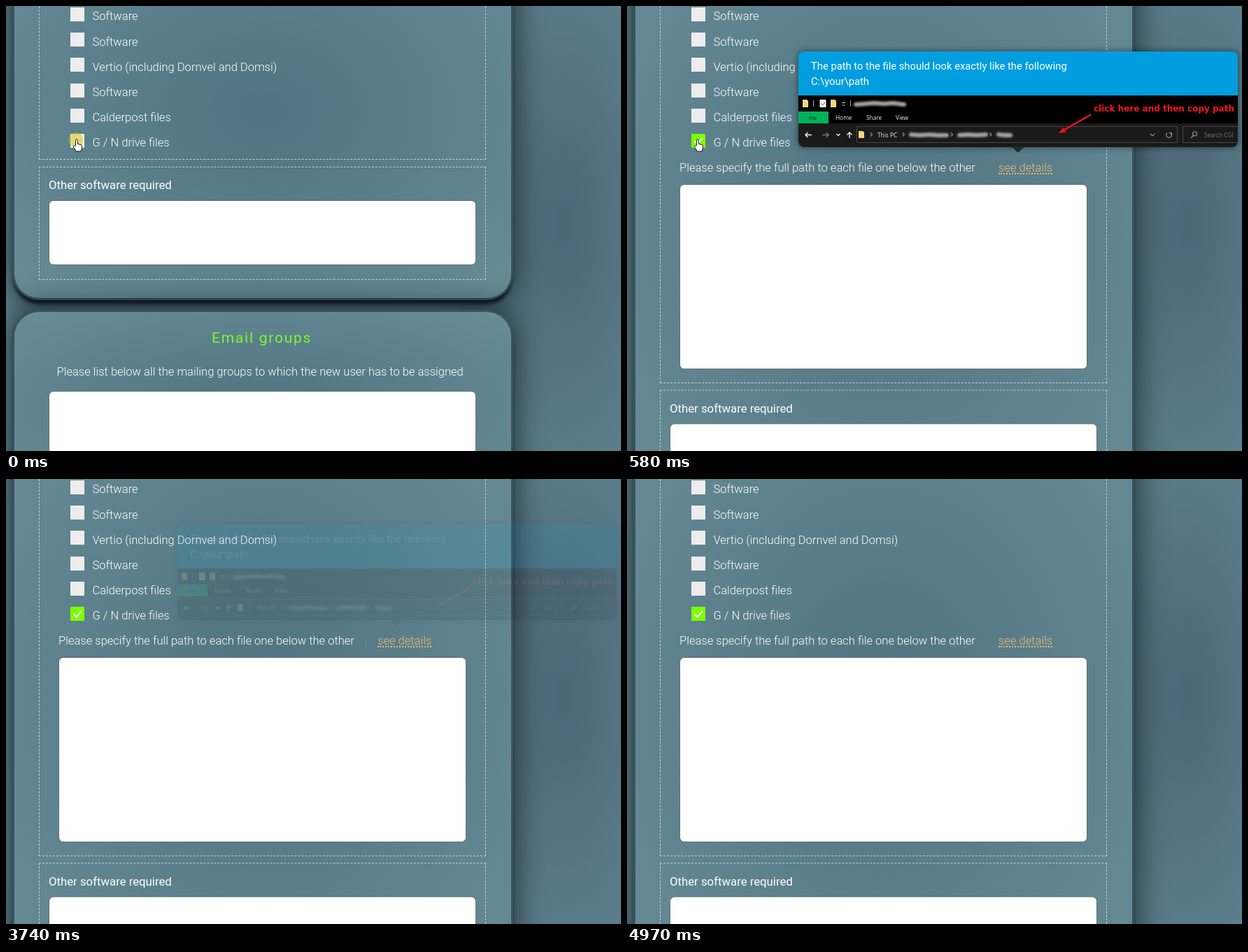
Recreate the animation shown at these times as an HTML page. Size 879 by 637 pixels, loop 5560 ms.

```html
<!DOCTYPE html>
<html lang="en">
<head>
<meta charset="utf-8">
<title>Form with path tooltip</title>
<style>
@property --d { syntax: "<length>"; inherits: true; initial-value: 0px; }

html, body { margin: 0; width: 100%; height: 100%; overflow: hidden; }
body {
  position: relative;
  font: 300 16.55px/20px Roboto, sans-serif;
  color: #fff;
  background: radial-gradient(ellipse 190px 480px at 798px 310px, #4c6676, #5f8590) #4c6676;
  animation: grow 5560ms infinite;
}
body *, body *::before { position: absolute; box-sizing: border-box; }
svg * { position: static; }
span { white-space: pre; }

.panel {
  left: 12px; width: 710px; border-radius: 35px;
  background: radial-gradient(ellipse at center, #4f7380, #688d97);
  box-shadow: 0 0 0 3px #3a525c, 0 8px 5px 1px #10181d, 0 0 40px 9px rgba(14, 24, 32, .68);
}
.main { top: -118px; height: calc(536px + var(--d)); }
.mail { top: 438px; height: 270px; }
.group { left: 47px; width: 639px; border: 1px dashed rgba(225, 235, 235, .75); }
.options { top: -40px; height: calc(260px + var(--d)); }
.other { top: 230px; height: 162px; }
.field { left: 61px; width: 611px; background: #fff; border: 1px solid #666c6f; border-radius: 7px; }
.lower { left: 0; top: 0; width: 879px; height: 900px; transform: translateY(var(--d)); }
.details { left: 0; top: 212px; width: 700px; height: calc(8px + var(--d)); overflow: hidden; animation: shown 5560ms infinite; }
.details .field { left: 75px; top: 43px; width: 583px; height: 265px; }
.link { left: 531px; top: 10.4px; height: 19px; color: #f6ba72; border-bottom: 2px dotted #f6ba72; }

.box { left: 92px; width: 20px; height: 20px; background: #eeecec; }
.checked { top: 183px; background: #7dff00; animation: shown 5560ms infinite; }
.halo { left: 89px; top: 181px; width: 21px; height: 21px; border-radius: 50%; animation: pressed 5560ms infinite; }
.under { background: #67b548; }
.over { left: 92px; top: 183px; width: 20px; height: 20px; overflow: hidden; animation: pressed 5560ms infinite; }
.over::before { content: ""; left: -3px; top: -2px; width: 21px; height: 21px; border-radius: 50%; background: rgba(228, 200, 62, .65); }

.tip { left: 245px; top: 65px; width: 628px; height: 145px; animation: tip 5560ms infinite; }
.card { width: 628px; height: 137px; border-radius: 8px; overflow: hidden; background: #009ddf; box-shadow: 0 0 9px 1px rgba(0, 0, 0, .45); }
.card span { left: 18px; font-size: 14.75px; font-weight: 400; }
.card svg { left: 0; top: 63px; }
.notch { left: 304px; top: 136px; border: 10px solid transparent; border-bottom: 0; border-top: 9px solid #20292d; }
.shot text { font: 8.3px "Open Sans", sans-serif; fill: #eee; }
.shot .note { font: bold 12px "DejaVu Sans", sans-serif; fill: #f5151d; }

.cursor { left: 0; top: 0; animation: travel 5560ms linear infinite; }
.cursor svg { overflow: visible; width: 1px; height: 1px; }
.hand { animation: hand 5560ms step-end infinite; }
.arrow { animation: arrow 5560ms step-end infinite; }
.beam { animation: beam 5560ms step-end infinite; }

@keyframes grow {
  0% { --d: 0px; animation-timing-function: step-end; }
  3.058% { --d: 10px; animation-timing-function: cubic-bezier(.41, .2, .63, 1); }
  7.194%, 100% { --d: 319.5px; }
}
@keyframes shown { 0%, 3.05% { opacity: 0; } 3.058%, 100% { opacity: 1; } }
@keyframes pressed { 0%, 3.05% { opacity: 1; } 3.058%, 100% { opacity: 0; } }
@keyframes tip {
  0% { opacity: 0; animation-timing-function: step-end; }
  10.43% { opacity: 1; animation-timing-function: step-end; }
  55.93% { opacity: 0; animation-timing-function: step-end; }
  66.5% { opacity: 0; animation-timing-function: ease; }
  73.92% { opacity: 1; }
  81.12% { opacity: 1; animation-timing-function: ease; }
  89.39%, 100% { opacity: 0; }
}
@keyframes travel {
  0%, 36.14% { transform: translate(101px, 191px); }
  36.15% { transform: translate(102px, 192px); }
  41.37% { transform: translate(150px, 200px); }
  45.86% { transform: translate(205px, 213px); }
  50.36% { transform: translate(250px, 226px); }
  55.94% { transform: translate(296px, 237px); }
  66.19% { transform: translate(502px, 238px); }
  70.14% { transform: translate(545px, 232px); }
  73.92%, 81.12% { transform: translate(549px, 235px); }
  89.39%, 100% { transform: translate(468px, 238px); }
}
@keyframes hand { 0% { opacity: 1; } 46.04%, 100% { opacity: 0; } }
@keyframes arrow {
  0% { opacity: 0; } 46.04% { opacity: 1; } 49.6% { opacity: 0; }
  68.6% { opacity: 1; } 83.3%, 100% { opacity: 0; }
}
@keyframes beam {
  0% { opacity: 0; } 49.6% { opacity: 1; } 68.6% { opacity: 0; } 83.3%, 100% { opacity: 1; }
}
</style>
</head>
<body>
<div class="panel main"></div>
<div class="group options"></div>
<div class="halo under"></div>
<div id="list"></div>
<div class="over"></div>
<div class="box checked">
  <svg width="20" height="20" fill="none" stroke="#fff" stroke-width="2"><path d="M4.5 10.5l4 4 7.5-8.5"/></svg>
</div>

<div class="details">
  <span style="left:75px;top:10.4px">Please specify the full path to each file one below the other</span>
  <span class="link">see details</span>
  <div class="field"></div>
</div>

<div class="lower">
  <div class="group other"></div>
  <span style="left:61px;top:246px;font-size:16.75px;font-weight:400">Other software required</span>
  <div class="field" style="top:278px;height:93px"></div>
  <div class="panel mail"></div>
  <span style="left:294px;top:465px;font-size:21px;font-weight:400;letter-spacing:1.75px;color:#7df82f">Email groups</span>
  <span style="left:72.5px;top:514px">Please list below all the mailing groups to which the new user has to be assigned</span>
  <div class="field" style="top:551px;height:120px"></div>
</div>

<div class="tip">
  <div class="card">
    <span style="top:11px">The path to the file should look exactly like the following</span>
    <span style="top:33px">C:\your\path</span>
    <svg class="shot" width="628" height="74" viewBox="245 128 628 74" fill="none">
      <defs>
        <filter id="soft" x="-20%" y="-60%" width="140%" height="220%"><feGaussianBlur stdDeviation="1.4"/></filter>
      </defs>
      <path fill="#000" d="M245 128h628v40H245z"/>
      <path fill="#1a1a1a" d="M245 168h628v34H245z"/>
      <path fill="#00b25a" d="M245 151h43v17h-43z"/>
      <path fill="#f4d77e" d="M251 134h6l2 2v9h-8zM291 134h6l2 2v9h-8zM331 179h6l2 2v8h-8z"/>
      <path fill="#f2f2f2" d="M275.500 134h9v11h-9z"/>
      <path stroke="#c33" d="M277.500 139.500l2 2.500 3.500-4"/>
      <path stroke="#aaa" d="M266.500 135v9M319.500 135v9"/>
      <path stroke="#ddd" d="M307 138.500h5M307.500 141l2 2 2-2"/>
      <g filter="url(#soft)" stroke="#a5a5a5" stroke-width="6" stroke-linecap="round">
        <path d="M327 141l14-1 12-1 14 1 14-1 15 2"/>
        <path d="M406 184l13 1 12-1 14 1 12 0M475 185l12-1 14 1 12-1M531 184l9 1 8 0"/>
      </g>
      <text x="260" y="162.500" style="font-size:7px;fill:#022">File</text>
      <text x="298" y="163">Home</text>
      <text x="342" y="163">Share</text>
      <text x="384" y="163">View</text>
      <path stroke="#484848" d="M328.500 172.500h458v23h-458zM873 172.500h-78.500v23h78.500"/>
      <g stroke="#eee" stroke-width="1.400">
        <path d="M264 184.500h-9m3.500-3.500l-3.500 3.500 3.500 3.500M299.500 183l2.500 2.500 2.500-2.500M318 189v-8m-3.500 3.500l3.500-3.500 3.500 3.500"/>
        <path stroke="#777" d="M279 184.500h9m-3.500-3.500l3.500 3.500-3.500 3.500"/>
      </g>
      <g stroke="#999" stroke-width="1.100">
        <path d="M348 181.500l2.500 2.500-2.500 2.500M394 181.500l2.500 2.500-2.500 2.500M463 181.500l2.500 2.500-2.500 2.500M518.500 181.500l2.500 2.500-2.500 2.500M748 183l3 3 3-3"/>
        <path d="M772 181.500a4 4 0 1 0 5.500 0M774.500 181.500h3v3"/>
        <circle cx="811.500" cy="183" r="3"/><path d="M809.500 185.500l-3.500 3.500"/>
      </g>
      <text x="358" y="187.500">This PC</text>
      <text x="825" y="187.500" style="fill:#777">Search CGI</text>
      <text class="note" x="667" y="151">click here and then copy path</text>
      <path stroke="#f5151d" stroke-width="2.200" d="M663 155.500L623 178.500"/>
      <path fill="#f5151d" d="M617 182l6.500-8 4 6.500z"/>
    </svg>
  </div>
  <div class="notch"></div>
</div>

<div class="cursor">
  <svg class="hand"><path transform="translate(-5.500 -.5)" fill="#fff" stroke="#151515" d="M4 9.500V2a1.500 1.500 0 0 1 3 0v5l4.500 1a2 2 0 0 1 1.500 2v3l-1.500 4.500H5L1 11.500a1.300 1.300 0 0 1 2-1.600z"/></svg>
  <svg class="arrow"><path fill="#fff" stroke="#222" stroke-width=".9" d="M0 0v12.500l3-2.700 2 4.500 2-.9-2-4.300h4z"/></svg>
  <svg class="beam"><path stroke="#c9a876" stroke-opacity=".5" d="M.5-5v9"/></svg>
</div>

<script>
const labels = ["Software", "Software", "Vertio (including Dornvel and Domsi)",
  "Software", "Calderpost files", "G / N drive files"];
document.getElementById("list").innerHTML = labels.map((label, i) => {
  const y = 36.2 * i;
  return `<div class="box" style="top:${Math.round(2 + y)}px"></div>
    <span style="left:123.5px;top:${5.4 + y}px">${label}</span>`;
}).join("");
</script>
</body>
</html>
```
